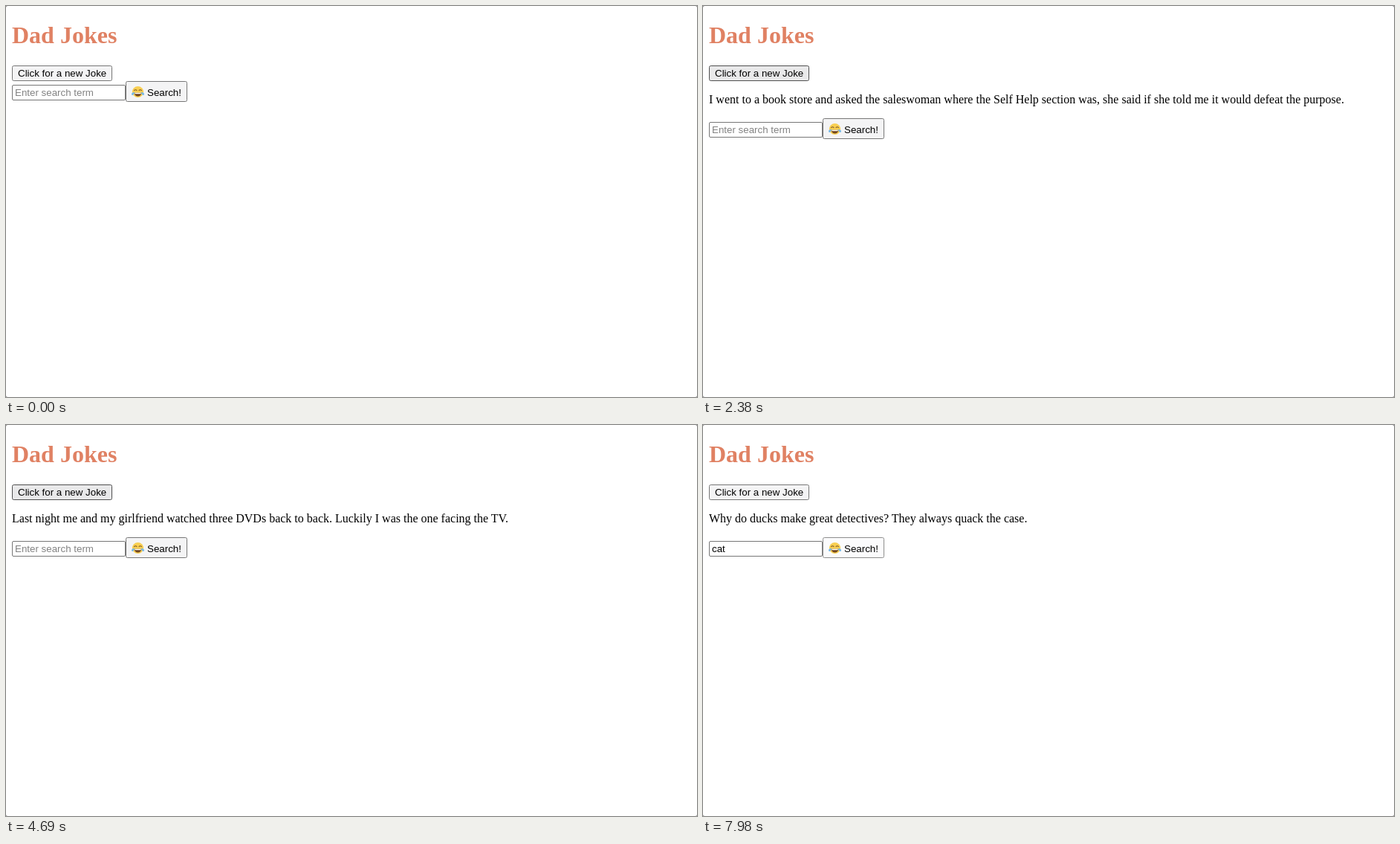
Recreate the animation shown at these times as an HTML page. Size 930 px wide and 526 px high, loop 8000 ms.

```html
<!DOCTYPE html>
<html lang="en">
<head>
<meta charset="utf-8">
<title>Dad Jokes</title>
<style>
  html, body { margin: 0; width: 100%; height: 100%; overflow: hidden; background: #fff; }
  svg { display: block; width: 930px; height: 526px; }
  svg * { animation: 8s step-end infinite; }
  text { font: 13.333px "Liberation Sans", Arial, sans-serif; white-space: pre; }
  .title { font: bold 32px "Liberation Serif", Times, serif; fill: #e08163; }
  .joke { font: 16px "Liberation Serif", Times, serif; opacity: 0; animation-timing-function: linear; }
  .box { fill: #f4f4f5; stroke: #767676; }
  .field { fill: #fff; }
  .hint { fill: #828282; animation-name: hint; }
  .ring { fill: none; stroke: #3a6fc0; stroke-width: 2; visibility: hidden; animation-name: ring; }
  .key { visibility: hidden; }

  #joke1 { animation-name: joke1; }
  #joke2 { animation-name: joke2; }
  #joke3 { animation-name: joke3; }
  #next { animation-name: next; }
  #find { animation-name: find; }
  #input { animation-name: input; }
  #form { animation-name: drop; }
  #caret { visibility: hidden; animation-name: blink, advance; }
  #c { animation-name: typeC; }
  #a { animation-name: typeA; }
  #t { animation-name: typeT; }

  @keyframes drop {
    0% { transform: translateY(0); }
    25.375%, 100% { transform: translateY(50px); }
  }
  @keyframes joke1 {
    0%, 25.374% { opacity: 0; }
    25.375% { opacity: .2; }
    29.6%, 47.249% { opacity: 1; }
    47.25%, 100% { opacity: 0; }
  }
  @keyframes joke2 {
    0%, 47.249% { opacity: 0; }
    47.25% { opacity: .2; }
    50.7%, 60.374% { opacity: 1; }
    60.375%, 100% { opacity: 0; }
  }
  @keyframes joke3 {
    0%, 60.374% { opacity: 0; }
    60.375% { opacity: .2; }
    63% { opacity: .76; }
    64.75%, 100% { opacity: 1; }
  }
  @keyframes next {
    0%, 64.75%, 100% { fill: #f4f4f5; stroke: #767676; }
    17.5%, 22.75%, 44.625%, 58.625% { fill: #e9e9ea; stroke: #4f4f4f; }
    20.125%, 42%, 55.125% { fill: #fbfbfc; stroke: #8d8d8d; }
  }
  @keyframes find {
    0% { fill: #f4f4f5; stroke: #767676; }
    93.625% { fill: #e9e9ea; stroke: #4f4f4f; }
    98%, 100% { fill: #fbfbfc; stroke: #8d8d8d; }
  }
  @keyframes input {
    0%, 98%, 100% { stroke: #767676; }
    66.5% { stroke: #4f4f4f; }
  }
  @keyframes ring {
    0%, 98%, 100% { visibility: hidden; }
    70% { visibility: visible; }
  }
  @keyframes hint {
    0% { visibility: visible; }
    78.75%, 100% { visibility: hidden; }
  }
  @keyframes blink {
    0%, 77.875%, 91%, 100% { visibility: hidden; }
    70%, 78.75% { visibility: visible; }
  }
  @keyframes advance {
    0% { transform: translateX(0); }
    78.75% { transform: translateX(7px); }
    81.375% { transform: translateX(14px); }
    84%, 100% { transform: translateX(18px); }
  }
  @keyframes typeC { 0% { visibility: hidden; } 78.75%, 100% { visibility: visible; } }
  @keyframes typeA { 0% { visibility: hidden; } 81.375%, 100% { visibility: visible; } }
  @keyframes typeT { 0% { visibility: hidden; } 84%, 100% { visibility: visible; } }
</style>
</head>
<body>
<svg viewBox="0 0 930 526">
  <rect width="930" height="526" fill="#8a8a8a"/>
  <rect width="930" height="526" rx="2.5" fill="#fff"/>

  <text class="title" x="8" y="50">Dad Jokes</text>
  <rect id="next" class="box" x="8.5" y="80.5" width="134" height="20" rx="2"/>
  <text x="16" y="95">Click for a new Joke</text>

  <text id="joke1" class="joke" x="8" y="131">I went to a book store and asked the saleswoman where the Self Help section was, she said if she told me it would defeat the purpose.</text>
  <text id="joke2" class="joke" x="8" y="131">Last night me and my girlfriend watched three DVDs back to back. Luckily I was the one facing the TV.</text>
  <text id="joke3" class="joke" x="8" y="131">Why do ducks make great detectives? They always quack the case.</text>

  <g id="form">
    <rect id="input" class="box field" x="8.5" y="106.5" width="152" height="20" rx="1.5"/>
    <text class="hint" x="12" y="121">Enter search term</text>
    <text x="12" y="121"><tspan id="c" class="key">c</tspan><tspan id="a" class="key">a</tspan><tspan id="t" class="key">t</tspan></text>
    <rect id="caret" x="12" y="109" width="1" height="15"/>

    <rect id="find" class="box" x="161.5" y="101.5" width="82" height="27" rx="2"/>
    <rect class="ring" x="8.5" y="106.5" width="152" height="20" rx="2"/>
    <g transform="translate(177.5 115.5)">
      <circle r="7.6" fill="#f8cf52"/>
      <path d="M-5.2-1.6q2-2.4 4 0M1.2-1.6q2-2.4 4 0" fill="none" stroke="#80592a" stroke-width="1.1"/>
      <path d="M-4.8 1.2H4.8Q4.2 6 0 6T-4.8 1.2Z" fill="#70451f"/>
      <path d="M-4.3 1.2H4.3L3.9 2.7H-3.9Z" fill="#fff"/>
      <path id="tear" d="M-4.4.2Q-8.8.8-8.5 3.4Q-7.6 5.4-5.8 3.8Q-4.8 2.6-4.4.2Z" fill="#75b8e4"/>
      <use href="#tear" transform="scale(-1 1)"/>
    </g>
    <text x="190" y="121">Search!</text>
  </g>
</svg>
</body>
</html>
```
